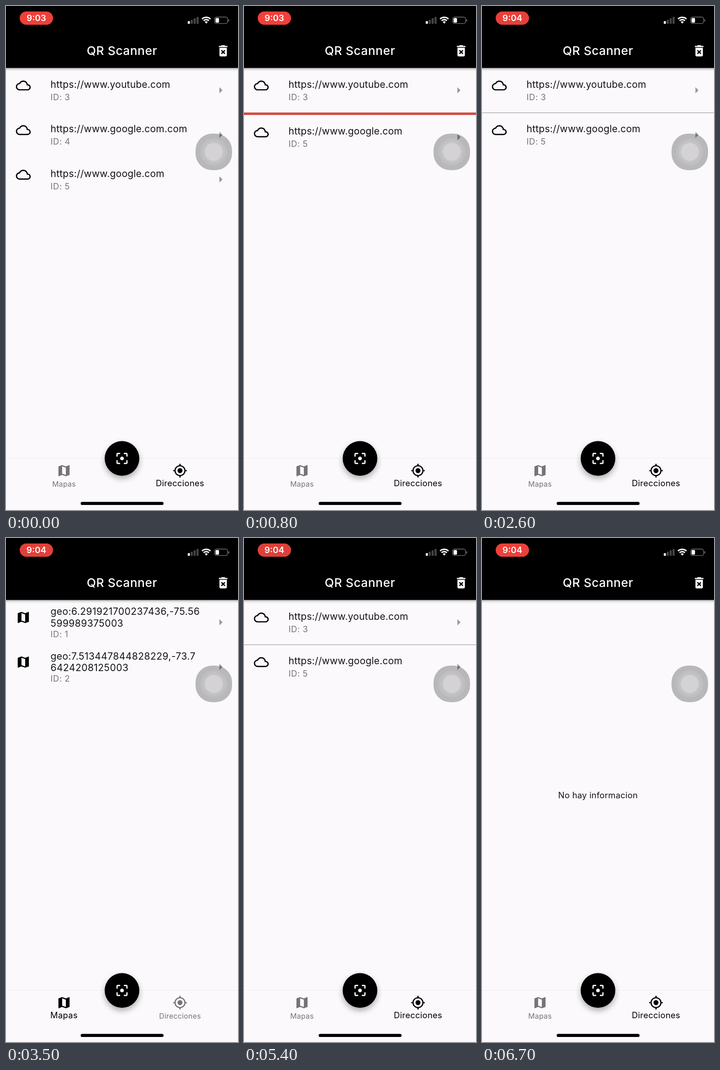
An HTML page with a canvas for the animation above (6.8 s loop, 508 by 1102 pixels).

```html
<!DOCTYPE html>
<html lang="es">
<head>
<meta charset="utf-8">
<title>QR Scanner</title>
<style>
  html, body { margin: 0; width: 100%; height: 100%; overflow: hidden; background: #fbf9fc; }
  canvas { display: block; }
</style>
</head>
<body>
<canvas id="stage" width="508" height="1102"></canvas>
<script>
const ctx = document.getElementById('stage').getContext('2d');
const W = 508, H = 1102, LOOP = 6800, STEP = 100;
const PT = W / 375;                 // device points to pixels
const BAR = 100 * PT, ROW = 72 * PT;
const PAPER = '#fbf9fc', INK = '#141316', GREY = '#757477', RED = '#f94339';

// Key moments in ms
const SWIPE = 100, SWIPED = 551, SHRINK = 671, SHRUNK = 851, MINUTE = 1500;
const TO_MAPS = 3100, TO_LINKS = 4850, PRESS = 5850, CLEARED = 6050;

const icons = {
  cloud: 'M19.35 10.04C18.67 6.59 15.64 4 12 4 9.11 4 6.6 5.64 5.35 8.04 2.34 8.36 0 10.91 0 14c0 3.31 2.69 6 6 6h13c2.76 0 5-2.24 5-5 0-2.64-2.05-4.78-4.65-4.96zM19 18H6c-2.21 0-4-1.79-4-4s1.79-4 4-4h.71C7.37 7.69 9.48 6 12 6c3.04 0 5.5 2.46 5.5 5.5v.5H19c1.66 0 3 1.34 3 3s-1.34 3-3 3z',
  map: 'M20.5 3l-.16.03L15 5.1 9 3 3.36 4.9c-.21.07-.36.25-.36.48V20.5c0 .28.22.5.5.5l.16-.03L9 18.9l6 2.1 5.64-1.9c.21-.07.36-.25.36-.48V3.5c0-.28-.22-.5-.5-.5zM15 19l-6-2.11V5l6 2.11V19z',
  target: 'M12 8c-2.21 0-4 1.79-4 4s1.79 4 4 4 4-1.79 4-4-1.79-4-4-4zm8.94 3c-.46-4.17-3.77-7.48-7.94-7.94V1h-2v2.06C6.83 3.52 3.52 6.83 3.06 11H1v2h2.06c.46 4.17 3.77 7.48 7.94 7.94V23h2v-2.06c4.17-.46 7.48-3.77 7.94-7.94H23v-2h-2.06zM12 19c-3.87 0-7-3.13-7-7s3.13-7 7-7 7 3.13 7 7-3.13 7-7 7z',
  focus: 'M5 15H3v4c0 1.1.9 2 2 2h4v-2H5v-4zM5 5h4V3H5c-1.1 0-2 .9-2 2v4h2V5zm14-2h-4v2h4v4h2V5c0-1.1-.9-2-2-2zm0 16h-4v2h4c1.1 0 2-.9 2-2v-4h-2v4zM12 9c-1.66 0-3 1.34-3 3s1.34 3 3 3 3-1.34 3-3-1.34-3-3-3z',
  trash: 'M6 19c0 1.1.9 2 2 2h8c1.1 0 2-.9 2-2V7H6v12zm2.46-7.12l1.41-1.41L12 12.59l2.12-2.12 1.41 1.41L13.41 14l2.12 2.12-1.41 1.41L12 15.41l-2.12 2.12-1.41-1.41L10.59 14l-2.13-2.12zM15.5 4l-1-1h-5l-1 1H5v2h14V4z',
  arrow: 'M10 17l5-5-5-5z'
};
for (const name in icons) icons[name] = new Path2D(icons[name]);

const links = [
  { id: 3, lines: ['https://www.youtube.com'] },
  { id: 4, lines: ['https://www.google.com.com'] },
  { id: 5, lines: ['https://www.google.com'] }
];
const places = [
  { id: 1, lines: ['geo:6.291921700237436,-75.56', '599989375003'] },
  { id: 2, lines: ['geo:7.513447844828229,-73.7', '6424208125003'] }
];

const mix = (a, b, p) => a + (b - a) * p;
const progress = (t, from, to) => Math.min(1, Math.max(0, (t - from) / (to - from)));

function bezier(x1, y1, x2, y2) {
  const at = (a, b, s) => 3 * a * s * (1 - s) ** 2 + 3 * b * s * s * (1 - s) + s ** 3;
  return x => {
    let lo = 0, hi = 1;
    for (let i = 0; i < 24; i++) {
      const mid = (lo + hi) / 2;
      if (at(x1, x2, mid) < x) lo = mid; else hi = mid;
    }
    return at(y1, y2, lo);
  };
}
const ease = bezier(.25, .1, .25, 1);
const fastOutSlowIn = bezier(.4, 0, .2, 1);

function icon(name, x, y, color) {
  ctx.save();
  ctx.translate(x - 12 * PT, y - 12 * PT);
  ctx.scale(PT, PT);
  ctx.fillStyle = color;
  ctx.fill(icons[name]);
  ctx.restore();
}

function text(str, x, y, size, color, { weight = 400, align = 'left', spacing = 0 } = {}) {
  ctx.font = `${weight} ${size}px Inter, sans-serif`;
  ctx.letterSpacing = spacing + 'px';
  ctx.textAlign = align;
  ctx.fillStyle = color;
  ctx.fillText(str, x, y);
}

function box(x, y, w, h, r, color) {
  ctx.beginPath();
  ctx.roundRect(x, y, w, h, r);
  ctx.fillStyle = color;
  ctx.fill();
}

function disc(x, y, r, color) {
  ctx.beginPath();
  ctx.arc(x, y, r, 0, 7);
  ctx.fillStyle = color;
  ctx.fill();
}

function withShadow(color, blur, dy, draw) {
  ctx.save();
  ctx.shadowColor = color;
  ctx.shadowBlur = blur;
  ctx.shadowOffsetY = dy;
  draw();
  ctx.restore();
}

function row({ id, lines }, y, dx = 0) {
  const wrapped = lines.length > 1;
  icon(wrapped ? 'map' : 'cloud', 37.9 + dx, y + 38.3, '#000');
  lines.forEach((line, i) =>
    text(line, 97.5 + dx, y + (wrapped ? 32.5 : 43.3) + i * 25.8, 21, INK, { spacing: wrapped ? .45 : .22 }));
  text('ID: ' + id, 97.5 + dx, y + (wrapped ? 81.3 : 70.4), 18.4, GREY, { spacing: .6 });
  icon('arrow', 470 + dx, y + ROW / 2, '#99979a');
}

function linkList(t) {
  const second = BAR + ROW;
  row(links[0], BAR);
  const left = 1 - ease(progress(t, SHRINK, SHRUNK));
  const height = ROW * left;
  if (left > 0) {
    const dx = -W * progress(t, SWIPE, SWIPED) ** 1.65;
    if (dx > -W) row(links[1], second, dx);
    if (dx < 0) {
      ctx.fillStyle = RED;
      ctx.fillRect(W + dx, second, -dx, height);
      ctx.strokeStyle = 'rgba(0,0,0,.25)';
      ctx.lineWidth = 1;
      ctx.strokeRect(W + dx + .5, second + .5, 1 - dx, Math.max(0, height - 1));
    }
  }
  row(links[2], second + height);
}

function body(t) {
  if (t >= CLEARED) text('No hay informacion', W / 2, 569, 18.4, INK, { align: 'center', spacing: .27 });
  else if (t >= TO_MAPS && t < TO_LINKS) places.forEach((p, i) => row(p, BAR + i * ROW));
  else linkList(t);
}

function header(t) {
  withShadow('rgba(0,0,0,.4)', 6, 2, () => {
    ctx.fillStyle = '#000';
    ctx.fillRect(-10, -10, W + 20, BAR + 10);
  });
  const fade = 1 - progress(t, 6100, 6300);
  const grow = progress(t, PRESS, PRESS + 200);
  if (grow > 0 && fade > 0) {
    ctx.save();
    ctx.beginPath();
    ctx.rect(0, 0, W, BAR);
    ctx.clip();
    disc(475.5, 98, 35 * PT * mix(.4, 1, grow), `rgba(255,250,255,${.235 * fade})`);
    ctx.restore();
  }
  text('QR Scanner', W / 2, 107, 26.3, '#fff', { weight: 500, align: 'center', spacing: .55 });
  icon('trash', 475.5, 98, '#fff');
}

function statusBar(t) {
  const glow = .5 + .5 * Math.cos((t - 870) / 1000 * 2 * Math.PI);
  box(30, 12, 73, 29, 14.5, `rgb(${mix(222, 241, glow)},64,57)`);
  text(t < MINUTE ? '9:03' : '9:04', 66.5, 33.2, 19, '#fff', { weight: 600, align: 'center' });

  for (let i = 0; i < 4; i++) {
    const h = 6 + i * 3.1;
    box(398 + i * 6.4, 39 - h, 4.6, h, 1.3, i ? '#454447' : '#fff');
  }

  const up = -Math.PI / 2, spread = .74;
  ctx.strokeStyle = ctx.fillStyle = '#fff';
  ctx.lineWidth = 3;
  for (const r of [8.7, 13.7]) {
    ctx.beginPath();
    ctx.arc(438.5, 38.5, r, up - spread, up + spread);
    ctx.stroke();
  }
  ctx.beginPath();
  ctx.moveTo(438.5, 38.5);
  ctx.arc(438.5, 38.5, 5, up - spread, up + spread);
  ctx.fill();

  ctx.beginPath();
  ctx.roundRect(456.7, 24.2, 28.6, 14.2, 4.5);
  ctx.strokeStyle = '#777579';
  ctx.lineWidth = 1.4;
  ctx.stroke();
  box(458.8, 26.2, 7.6, 10.2, 2.2, '#fff');
  box(486.8, 29, 1.8, 4.8, 1, '#777579');
}

function tab(name, label, x, on) {
  const shade = mix(117, 0, on);
  const color = `rgb(${shade},${shade},${shade})`;
  icon(name, x, 1016, color);
  text(label, x, mix(1050.6, 1050, on), mix(15.8, 18.4, on), color, { align: 'center', spacing: .3 });
}

function tabRipple(t, x, start) {
  const grow = progress(t, start, start + 150), fade = 1 - progress(t, start + 250, start + 450);
  if (grow > 0 && fade > 0) disc(x, 1028, mix(20, 46, grow), `rgba(0,0,0,${.016 * fade})`);
}

function navigation(t) {
  ctx.fillStyle = PAPER;
  ctx.fillRect(0, 989, W, H - 989);
  ctx.fillStyle = '#f0eef1';
  ctx.fillRect(0, 988, W, 1.2);
  tabRipple(t, 127, TO_MAPS - 200);
  tabRipple(t, 381, TO_LINKS - 200);
  const maps = fastOutSlowIn(progress(t, TO_MAPS, TO_MAPS + 270))
             - fastOutSlowIn(progress(t, TO_LINKS, TO_LINKS + 270));
  tab('map', 'Mapas', 127, maps);
  tab('target', 'Direcciones', 381, 1 - maps);
  withShadow('rgba(0,0,0,.32)', 13, 6, () => disc(254, 989.3, 28 * PT, '#000'));
  icon('focus', 254, 989.3, '#fff');
  box(163.5, 1084.3, 181.5, 6.8, 3.4, '#000');
}

function touchButton() {
  box(415, 279, 80, 80, 36.5, 'rgba(0,0,0,.265)');
  disc(455, 319, 30, 'rgba(255,255,255,.08)');
  disc(455, 319, 25, 'rgba(255,255,255,.08)');
  disc(455, 319, 19.7, 'rgba(255,250,255,.28)');
}

function frame() {
  const t = Math.floor(performance.now() % LOOP / STEP) * STEP;
  ctx.fillStyle = PAPER;
  ctx.fillRect(0, 0, W, H);
  body(t);
  header(t);
  statusBar(t);
  navigation(t);
  touchButton();
  requestAnimationFrame(frame);
}
frame();
</script>
</body>
</html>
```
